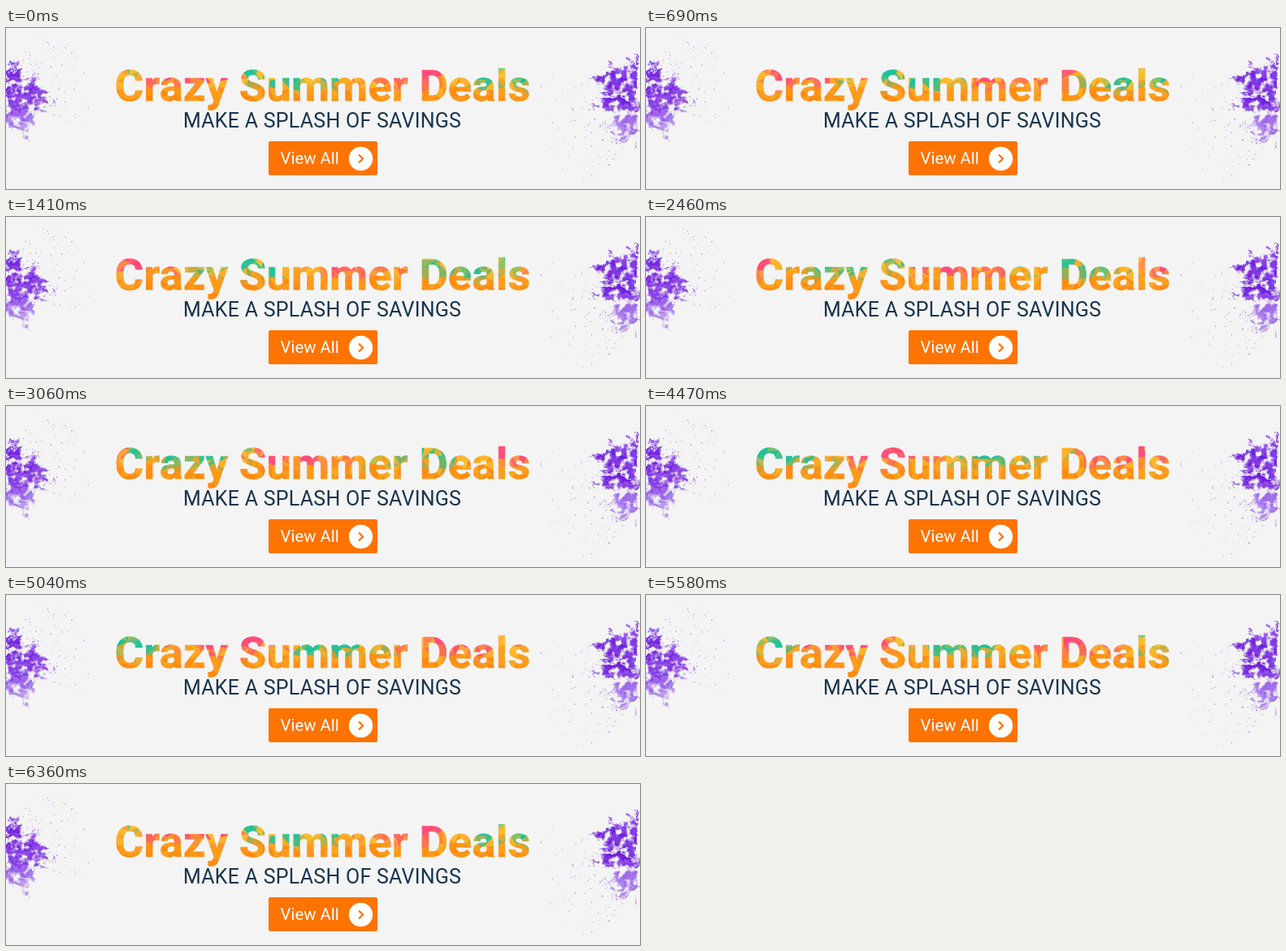
Recreate the animation shown at these times as an HTML page. Size 780 by 199 pixels, loop 6390 ms.

```html
<!DOCTYPE html>
<html lang="en">
<head>
<meta charset="utf-8">
<title>Crazy Summer Deals</title>
<style>
html, body { margin: 0; width: 100%; height: 100%; overflow: hidden; background: #f4f4f4; }
svg { position: absolute; left: 0; top: 0; will-change: transform; font-family: Roboto, "Liberation Sans", sans-serif; }
</style>
</head>
<body>
<svg width="780" height="199">
  <filter id="grain" filterUnits="userSpaceOnUse" x="0" y="0" width="780" height="199" color-interpolation-filters="sRGB">
    <feTurbulence type="fractalNoise" baseFrequency=".06" numOctaves="4" seed="3" result="bend"/>
    <feDisplacementMap in="SourceGraphic" in2="bend" scale="24" xChannelSelector="R" yChannelSelector="G" result="bent"/>
    <feTurbulence type="fractalNoise" baseFrequency=".11" numOctaves="4" seed="8"/>
    <feColorMatrix values="0 0 0 0 0  0 0 0 0 0  0 0 0 0 0  5 0 0 0 -1.6" result="holes"/>
    <feComposite in="bent" in2="holes" operator="in"/>
  </filter>
  <g id="powder" filter="url(#grain)"></g>
  <g id="dust"></g>
</svg>
<svg width="780" height="199">
  <mask id="title" maskUnits="userSpaceOnUse" x="120" y="40" width="540" height="70">
    <text x="133.8" y="90" font-size="54.3" font-weight="700" letter-spacing=".15" fill="#fff" stroke="#fff" stroke-width=".7">Crazy Summer Deals</text>
  </mask>
  <g id="mesh" mask="url(#title)"></g>
  <text x="218" y="123" font-size="25" letter-spacing=".25" fill="#17344f">MAKE A SPLASH OF SAVINGS</text>
  <rect x="323" y="140" width="134" height="42" rx="2" fill="#ff7300"/>
  <text x="337.6" y="168" font-size="20.3" fill="#fff">View All</text>
  <circle cx="436.5" cy="161.5" r="14.7" fill="#fff"/>
  <path d="M434 156.5l5 5-5 5" fill="none" stroke="#ff7300" stroke-width="2.2"/>
</svg>
<script>
const $ = id => document.getElementById(id);
const clamp = v => Math.max(0, Math.min(1, v));
const TAU = 2 * Math.PI;
let seed = 11;
const rnd = (a = 0, b = 1) => {
  seed = (seed * 16807) % 2147483647;
  return a + (b - a) * seed / 2147483647;
};
const add = (parent, tag, attrs) => {
  const el = document.createElementNS('http://www.w3.org/2000/svg', tag);
  for (const k in attrs) el.setAttribute(k, attrs[k]);
  return parent.appendChild(el);
};

// Powder burst: rays from a point off stage, roughened by the filter, plus loose dust
function burst(cx, dir, reach) {
  const at = (a, r) => [cx + dir * r * Math.cos(a), 90 + r * Math.sin(a)];
  for (let i = 0; i < 75; i++) {
    const a = rnd(-1.1, 1.05), r = reach * rnd(.62, 1) * (1 - .3 * Math.abs(a)), w = rnd(.03, .08);
    const light = rnd(48, 60) + 14 * clamp(a * 1.5);
    add($('powder'), 'polygon', {
      points: [at(a, 0), at(a - w, r * .8), at(a, r), at(a + w, r * .75)].join(' '),
      fill: `hsl(${rnd(261, 268)} 76% ${light}%)`, opacity: a > .4 ? .6 : .85
    });
  }
  for (let i = 0; i < 150; i++) {
    const a = -dir * rnd(-.3, 1) * .9, [x, y] = at(a, reach * (.7 + .75 * rnd() ** 1.8));
    add($('dust'), 'circle', { cx: x, cy: y, r: rnd(.25, .8), fill: '#7a45dc', opacity: rnd(.2, .75) });
  }
}
burst(-25, 1, 88);
burst(807, -1, 104);

// Triangle mesh: a colour wave passes leftwards over a warm base
const GREEN = [28, 194, 152], PINK = [255, 75, 120], YELLOW = [252, 188, 44], ORANGE = [255, 138, 14];
const CELL = 11, COLS = 49, ROWS = 6, WAVE = 279;
const mix = (a, b, u) => a.map((v, i) => v + (b[i] - v) * u);

const nodes = [];
for (let j = 0; j <= ROWS; j++)
  for (let i = 0; i <= COLS; i++)
    nodes.push({ x: 118 + i * CELL + rnd(-4, 4), y: 42 + j * CELL + rnd(-4, 4), phase: rnd(0, TAU) });

const tris = [];
function addTri(...ids) {
  const pts = ids.map(i => nodes[i]);
  const x = pts.reduce((s, p) => s + p.x, 0) / 3, y = pts.reduce((s, p) => s + p.y, 0) / 3;
  tris.push({
    pts, x,
    base: mix(YELLOW, ORANGE, clamp((y - 58) / 32 + rnd(-.4, .4))),
    tint: clamp((77 - y + rnd(-7, 7)) / 14),
    bias: rnd(-.45, .45),
    el: add($('mesh'), 'polygon', { 'stroke-width': .6 })
  });
}
for (let j = 0; j < ROWS; j++)
  for (let i = 0; i < COLS; i++) {
    const a = j * (COLS + 1) + i, b = a + 1, c = a + COLS + 1, d = c + 1;
    if ((i + j) % 2) { addTri(a, b, c); addTri(b, d, c); }
    else { addTri(a, b, d); addTri(a, d, c); }
  }

function draw(now) {
  // Steps average 55 ms, aligned to a 30 ms clock
  const tick = Math.floor((now % 6390) / 30);
  const step = Math.ceil((30 * (tick + 1) + 10) / 55) - 1;
  const w = TAU * step / 116;
  for (const n of nodes)
    n.at = `${(n.x + 2 * Math.sin(w + n.phase)).toFixed(2)},${(n.y + 2 * Math.cos(w + n.phase)).toFixed(2)}`;
  for (const { pts, x, base, tint, bias, el } of tris) {
    const v = Math.cos(w + TAU * ((x - 300) / WAVE - .2)) + .45 * Math.sin(x * .13 + 2 * w) + bias;
    const fill = `rgb(${mix(base, v > 0 ? GREEN : PINK, tint * clamp((Math.abs(v) - .25) * 1.8)).map(Math.round)})`;
    el.setAttribute('points', pts.map(p => p.at).join(' '));
    el.setAttribute('fill', fill);
    el.setAttribute('stroke', fill);
  }
}
const start = performance.now();
(function loop() {
  draw(performance.now() - start);
  requestAnimationFrame(loop);
})();
</script>
</body>
</html>
```
